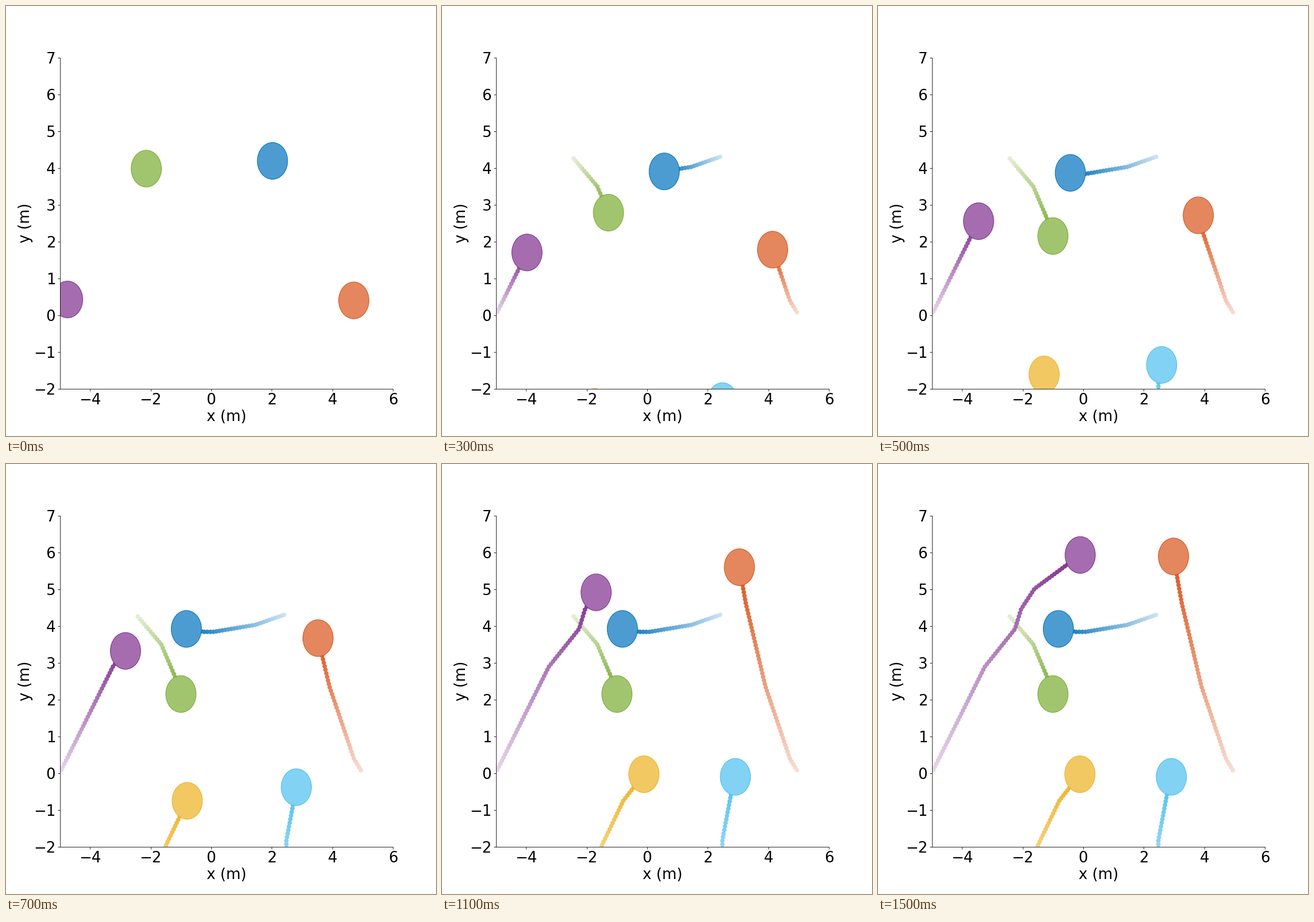
These frames come from a looping animation (748 px wide and 748 px high, 2.5 s). A matplotlib script:

```python
import numpy as np
import matplotlib.pyplot as plt
from matplotlib.animation import FuncAnimation
from matplotlib.colors import to_rgb
from matplotlib.patches import Circle

SIZE, DPI, FONT = 748, 74.8, 25
FRAMES, INTERVAL = 25, 100
MOVING_FRAMES = 16
STEPS_PER_FRAME = 5
STEP = 0.1
RADIUS = 0.5
START_RADIUS = 5

# Agents start on a hexagon and walk at constant speed through their turns
# to the last point.
ROUTES = {
    "#D95319": [(4.71, 0.39), (3.9, 2.36), (3.25, 4.63), (2.98, 5.89)],
    "#0072BD": [(1.46, 4.03), (0.08, 3.84), (-0.23, 3.84), (-0.82, 3.92)],
    "#77AC30": [(-1.65, 3.5), (-1.05, 2.34), (-1.0, 2.15)],
    "#7E2F8E": [(-3.25, 2.89), (-2.25, 3.92), (-2.05, 4.46), (-1.61, 5.01),
                (-0.1, 5.93)],
    "#EDB120": [(-1.54, -2.04), (-0.79, -0.75), (-0.11, -0.03)],
    "#4DBEEE": [(2.48, -1.83), (2.81, -0.38), (2.91, -0.1)],
}


def on_white(color, alpha):
    """Blend a colour with white for one or many alpha values."""
    alpha = np.atleast_1d(alpha)[:, None]
    return alpha * np.array(to_rgb(color)) + 1 - alpha


def walk(points):
    """Positions after each equal step along a polyline."""
    points = np.array(points)
    lengths = np.hypot(*np.diff(points, axis=0).T)
    travelled = np.concatenate([[0], np.cumsum(lengths)])
    total = travelled[-1]
    distance = np.linspace(0, total, round(total / STEP) + 1)[1:]
    return np.column_stack([np.interp(distance, travelled, coordinate)
                            for coordinate in points.T])


class Agent:
    def __init__(self, ax, index, color, route):
        angle = index * np.pi / 3
        start = (START_RADIUS * np.cos(angle), START_RADIUS * np.sin(angle))
        self.color = color
        self.path = walk([start, *route])
        self.trail = ax.scatter([], [], s=36, linewidths=1.5, zorder=1)
        self.body = Circle(start, RADIUS, fc=on_white(color, 0.7)[0],
                           ec=color, lw=1, zorder=2)
        ax.add_patch(self.body)

    def show(self, count):
        points = self.path[:count]
        shades = on_white(self.color, np.linspace(0.2, 1, len(points)))
        self.trail.set_offsets(points)
        self.trail.set_facecolor(shades)
        self.trail.set_edgecolor(shades)
        self.body.center = points[-1]


plt.rcParams.update({"font.family": "DejaVu Sans", "font.size": FONT})
fig = plt.figure(figsize=(SIZE / DPI, SIZE / DPI), dpi=DPI, facecolor="white")
ax = fig.add_axes([0.125, 0.11, 0.775, 0.77])
ax.set(xlim=(-5, 6), ylim=(-2, 7),
       xticks=range(-4, 7, 2), yticks=range(-2, 8))
ax.spines[["top", "right"]].set_visible(False)

label_style = dict(ha="center", va="baseline", rotation_mode="anchor")
fig.text(0.5125, 1 - 722 / SIZE, "x (m)", **label_style)
fig.text(41 / SIZE, 0.495, "y (m)", rotation=90, **label_style)

agents = [Agent(ax, index, color, route)
          for index, (color, route) in enumerate(ROUTES.items())]


def update(frame):
    count = STEPS_PER_FRAME * (min(frame, MOVING_FRAMES - 1) + 1)
    for agent in agents:
        agent.show(count)
    return []


anim = FuncAnimation(fig, update, frames=FRAMES, interval=INTERVAL,
                     repeat=True, repeat_delay=0, blit=False)
plt.show()
```
